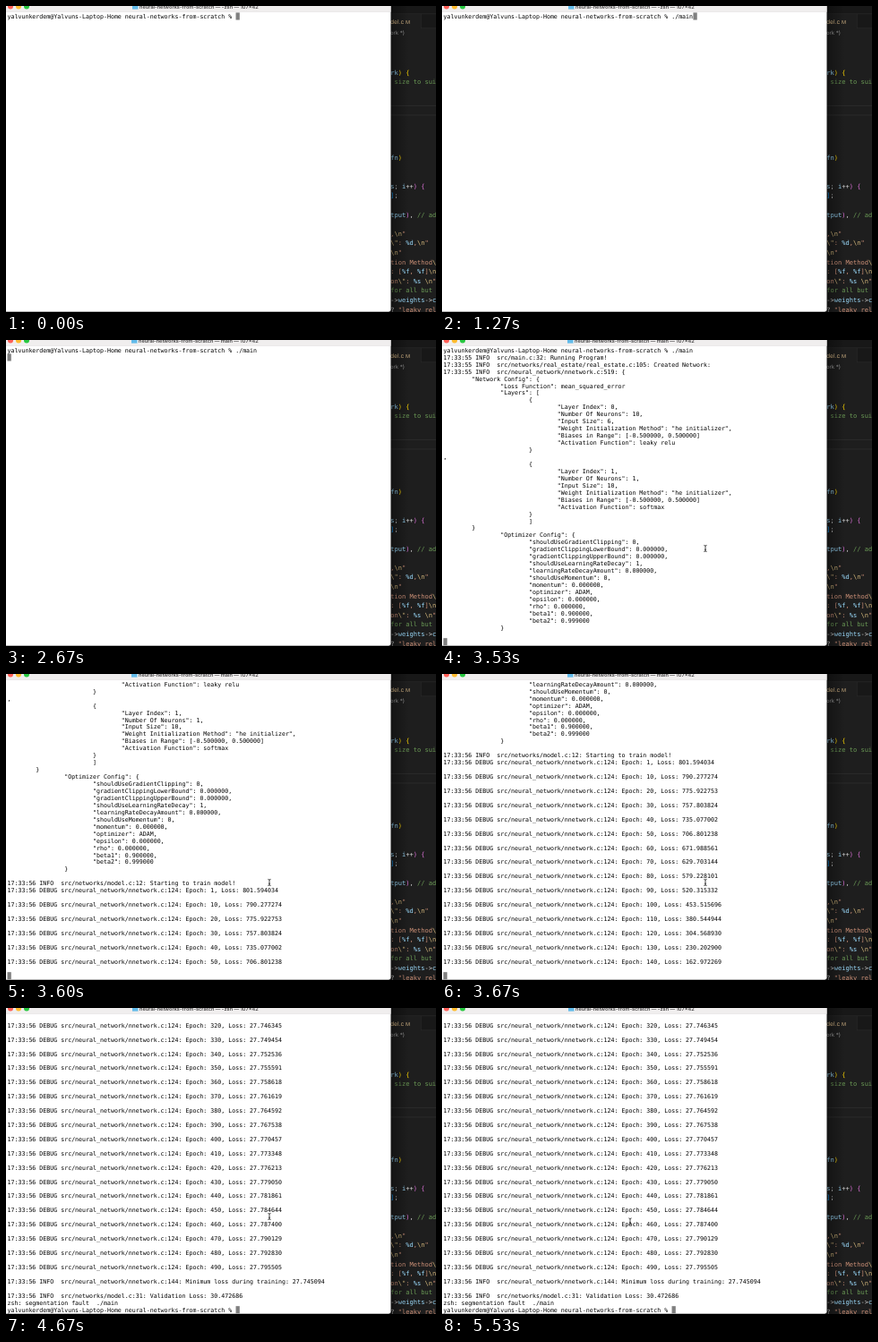
These frames come from a looping animation (480x342 px, 5790 ms). An HTML page with a canvas:

```html
<!DOCTYPE html>
<html lang="en">
<head>
<meta charset="utf-8">
<title>Terminal training run</title>
<style>
html, body { margin: 0; width: 100%; height: 100%; overflow: hidden; background: #1e1e1e; }
canvas { display: block; width: 480px; height: 342px; }
</style>
</head>
<body>
<canvas id="stage"></canvas>
<script>
const W = 480, H = 342, LOOP = 5790, FRAME = 66.6;
const canvas = document.getElementById('stage');
const ctx = canvas.getContext('2d');
const ratio = window.devicePixelRatio || 1;
canvas.width = Math.round(W * ratio);
canvas.height = Math.round(H * ratio);

const MONO = '"DejaVu Sans Mono", monospace';
const SANS = 'Inter, sans-serif';
const ADVANCE = 0.60205;

// Terminal grid
const ROWS = 42, LEFT = 1.5, TOP = 7.4, CELL_W = 3.985, CELL_H = 7.946;
const TERM_FONT = `${CELL_W / ADVANCE}px ${MONO}`;
const WIN_W = 429.5, WIN_H = 341.5;

// Editor grid
const CODE_X = 429.2, CODE_Y = 76.5, CODE_W = 4.25, CODE_H = 10.6;
const CODE_FONT = `${CODE_W / ADVANCE}px ${MONO}`;
const INK = {
  plain: '#d4d4d4', name: '#9cdcfe', string: '#ce9178', escape: '#d7ba7d',
  note: '#6a9955', gold: '#ffd700', pink: '#da70d6', blue: '#179fff'
};

// Moments of the session, in ms
const BLINK = 470, TYPE = 930, ENTER = 2400, RUN = 2670;
const AIM = 3070, PRINT = 3530, EXIT = 4063, LEAVE = 5130;

const PROMPT = 'yalvunkerdem@Yalvuns-Laptop-Home neural-networks-from-scratch % ';
const COMMAND = './main';

const pad = (n, lines) => lines.map(s => ' '.repeat(n) + s);
const clamp = (v, lo, hi) => Math.min(hi, Math.max(lo, v));
const framesSince = (t, from) => Math.floor((t - from) / FRAME);

function layer(index, neurons, input, activation) {
  return [
    ...pad(24, ['{']),
    ...pad(32, [
      `"Layer Index": ${index},`,
      `"Number Of Neurons": ${neurons},`,
      `"Input Size": ${input},`,
      '"Weight Initialization Method": "he initializer",',
      '"Biases in Range": [-0.500000, 0.500000]',
      `"Activation Function": ${activation}`
    ]),
    ...pad(24, ['}'])
  ];
}

// A Gompertz fall onto a floor that creeps upwards late in training
function loss(i) {
  const k = Math.max(0, i - 32);
  const floor = 27.746345 + 0.0031226 * k - 0.00001358 * k * k;
  return floor + 773.847689 * Math.exp(-0.0508 * (1.29 ** i - 1));
}

function epochs() {
  const out = [];
  for (let i = 0; i < 50; i++) {
    out.push(`17:33:56 DEBUG src/neural_network/nnetwork.c:124: Epoch: ${i * 10 || 1}, Loss: ${loss(i).toFixed(6)}`, '');
  }
  return out;
}

const CONFIG = [
  PROMPT + COMMAND,
  '17:33:55 INFO  src/main.c:32: Running Program!',
  '17:33:55 INFO  src/networks/real_estate/real_estate.c:105: Created Network:',
  '17:33:55 INFO  src/neural_network/nnetwork.c:519: {',
  ...pad(8, ['"Network Config": {']),
  ...pad(16, ['"Loss Function": mean_squared_error', '"Layers": [']),
  ...layer(0, 10, 6, 'leaky relu'),
  ',',
  ...layer(1, 1, 10, 'softmax'),
  ...pad(24, [']']),
  ...pad(8, ['}']),
  ...pad(16, ['"Optimizer Config": {']),
  ...pad(24, [
    '"shouldUseGradientClipping": 0,',
    '"gradientClippingLowerBound": 0.000000,',
    '"gradientClippingUpperBound": 0.000000,',
    '"shouldUseLearningRateDecay": 1,',
    '"learningRateDecayAmount": 0.000000,',
    '"shouldUseMomentum": 0,',
    '"momentum": 0.000000,',
    '"optimizer": ADAM,',
    '"epsilon": 0.000000,',
    '"rho": 0.000000,',
    '"beta1": 0.900000,',
    '"beta2": 0.999000'
  ]),
  ...pad(16, ['}']),
  ''
];
const LOG = [
  ...CONFIG,
  '17:33:56 INFO  src/networks/model.c:12: Starting to train model!',
  ...epochs(),
  '17:33:56 INFO  src/neural_network/nnetwork.c:144: Minimum loss during training: 27.745094',
  '',
  '17:33:56 INFO  src/networks/model.c:31: Validation Loss: 30.472686',
  'zsh: segmentation fault  ./main'
];

// The program prints 8.5 epochs, two lines each, per frame
function printed(t) {
  if (t < PRINT) return 1;
  return clamp(38 + 2 * Math.floor(8.5 * framesSince(t, PRINT)), CONFIG.length, LOG.length);
}

function screenLines(t) {
  if (t < ENTER) {
    const typed = clamp(1 + framesSince(t, TYPE), 0, COMMAND.length);
    return [PROMPT + COMMAND.slice(0, typed)];
  }
  const done = printed(t);
  return [...LOG.slice(0, done), done === LOG.length ? PROMPT : ''];
}

function bezier(a, b, c, d, u) {
  const v = 1 - u;
  return v * v * v * a + 3 * v * v * u * b + 3 * v * u * u * c + u * u * u * d;
}

function pointerAt(t) {
  if (t < LEAVE) {
    const u = clamp(framesSince(t, AIM) / 2, 0, 1);
    return [334 - 40 * u, 283 - 50 * u];
  }
  const u = clamp((framesSince(t, LEAVE) + 1) / 7, 0, 1);
  return [bezier(294, 250, 150, 210, u), bezier(233, 165, 112, 238.5, u)];
}

function text(s, x, y, font, color) {
  ctx.font = font;
  ctx.fillStyle = color;
  ctx.fillText(s, x, y);
}

function rect(x, y, w, h, color) {
  ctx.fillStyle = color;
  ctx.fillRect(x, y, w, h);
}

// Parts alternate between ink name and text
function code(row, ...parts) {
  let col = 0;
  for (let i = 0; i < parts.length; i += 2) {
    text(parts[i + 1], CODE_X + col * CODE_W, CODE_Y + row * CODE_H, CODE_FONT, INK[parts[i]]);
    col += parts[i + 1].length;
  }
}

function drawEditor() {
  rect(0, 0, W, H, '#1e1e1e');
  rect(425, 0, 55, 25, '#181818');
  rect(425, 9, 38, 16, '#1e1e1e');
  rect(425, 8.5, 55, 0.6, '#2b2b2b');
  rect(463, 9, 0.6, 16, '#2b2b2b');
  rect(463, 24.5, 17, 0.6, '#2b2b2b');
  text('del.c', 429, 20.3, `6.6px ${SANS}`, '#e2c08d');
  text('M', 446, 20, `5.6px ${SANS}`, '#c4a87d');
  text('ork *)', 429, 32.3, `6px ${SANS}`, '#a0a0a0');

  rect(425, 111, 55, 0.7, '#303030');
  rect(425, 121.6, 55, 0.7, '#303030');

  code(0, 'name', 'rk', 'gold', ') {');
  code(1, 'note', ' size to sui');
  code(9, 'name', 'fn', 'gold', ')');
  code(12, 'name', 's', 'plain', '; ', 'name', 'i', 'plain', '++', 'pink', ') {');
  code(13, 'blue', ']', 'plain', ';');
  code(15, 'name', 'tput', 'pink', ')', 'plain', ', ', 'note', '// ad');
  code(17, 'string', ',', 'escape', '\\n', 'string', '"');
  code(18, 'escape', '\\"', 'string', ': ', 'name', '%d', 'string', ',', 'escape', '\\n', 'string', '"');
  code(19, 'escape', '\\n', 'string', '"');
  code(20, 'string', 'tion Method', 'escape', '\\');
  code(21, 'string', ': [', 'name', '%f', 'string', ', ', 'name', '%f', 'string', ']', 'escape', '\\n');
  code(22, 'string', 'on', 'escape', '\\"', 'string', ': ', 'name', '%s', 'string', ' ', 'escape', '\\n', 'string', '"');
  code(23, 'note', 'for all but');
  code(24, 'plain', '->', 'name', 'weights', 'plain', '->', 'name', 'c');
  code(25, 'plain', '? ', 'string', '"leaky rel');

  const shade = ctx.createLinearGradient(WIN_W, 0, WIN_W + 20, 0);
  shade.addColorStop(0, 'rgba(0,0,0,.35)');
  shade.addColorStop(1, 'rgba(0,0,0,0)');
  rect(WIN_W, 0, 20, H, shade);
}

function drawTitleBar(running) {
  rect(0, 0, WIN_W, 6.5, '#f0eeee');
  rect(0, 6, WIN_W, 0.5, '#dedbdc');
  ['#ff5f57', '#febc2e', '#28c840'].forEach((color, i) => {
    ctx.fillStyle = color;
    ctx.beginPath();
    ctx.arc(5 + i * 9, 0.5, 3, 0, Math.PI * 2);
    ctx.fill();
  });
  rect(running ? 140 : 141, 0, 6.5, 3.6, '#62bbea');
  const job = running ? 'main' : '-zsh';
  text(`neural-networks-from-scratch — ${job} — 107×42`, running ? 148 : 149, 3, `600 5.6px ${SANS}`, '#454344');
}

function drawTerminal(t) {
  rect(0, 341, WIN_W - 2, 1, '#777777');
  ctx.fillStyle = '#ffffff';
  ctx.beginPath();
  ctx.roundRect(0, -10, WIN_W, WIN_H + 10, [0, 0, 2, 0]);
  ctx.fill();
  drawTitleBar(t >= RUN && t < EXIT);

  const lines = screenLines(t).slice(-ROWS);
  const last = lines.length - 1;
  if (t < BLINK || t >= TYPE) {
    rect(LEFT + lines[last].length * CELL_W, TOP + last * CELL_H, CELL_W + 0.3, CELL_H + 0.2, '#7f7f7f');
  }
  lines.forEach((s, row) => text(s, LEFT, TOP + 6.4 + row * CELL_H, TERM_FONT, '#000000'));
}

function drawPointer(t) {
  if (t < AIM) return;
  ctx.save();
  ctx.translate(...pointerAt(t));
  ctx.strokeStyle = '#222222';
  ctx.lineWidth = 0.8;
  ctx.beginPath();
  for (const side of [-1, 1]) {
    ctx.moveTo(-1.6, 3.6 * side);
    ctx.quadraticCurveTo(0, 3.6 * side, 0, 2.4 * side);
    ctx.quadraticCurveTo(0, 3.6 * side, 1.6, 3.6 * side);
  }
  ctx.moveTo(0, -2.6);
  ctx.lineTo(0, 2.6);
  ctx.moveTo(-1, 1.2);
  ctx.lineTo(1, 1.2);
  ctx.stroke();
  ctx.restore();
}

function draw(t) {
  ctx.setTransform(ratio, 0, 0, ratio, 0, 0);
  ctx.textRendering = 'geometricPrecision';
  ctx.fontKerning = 'none';
  drawEditor();
  drawTerminal(t);
  drawPointer(t);
}

const start = performance.now();
function tick() {
  draw((performance.now() - start) % LOOP);
  requestAnimationFrame(tick);
}
tick();
</script>
</body>
</html>
```
